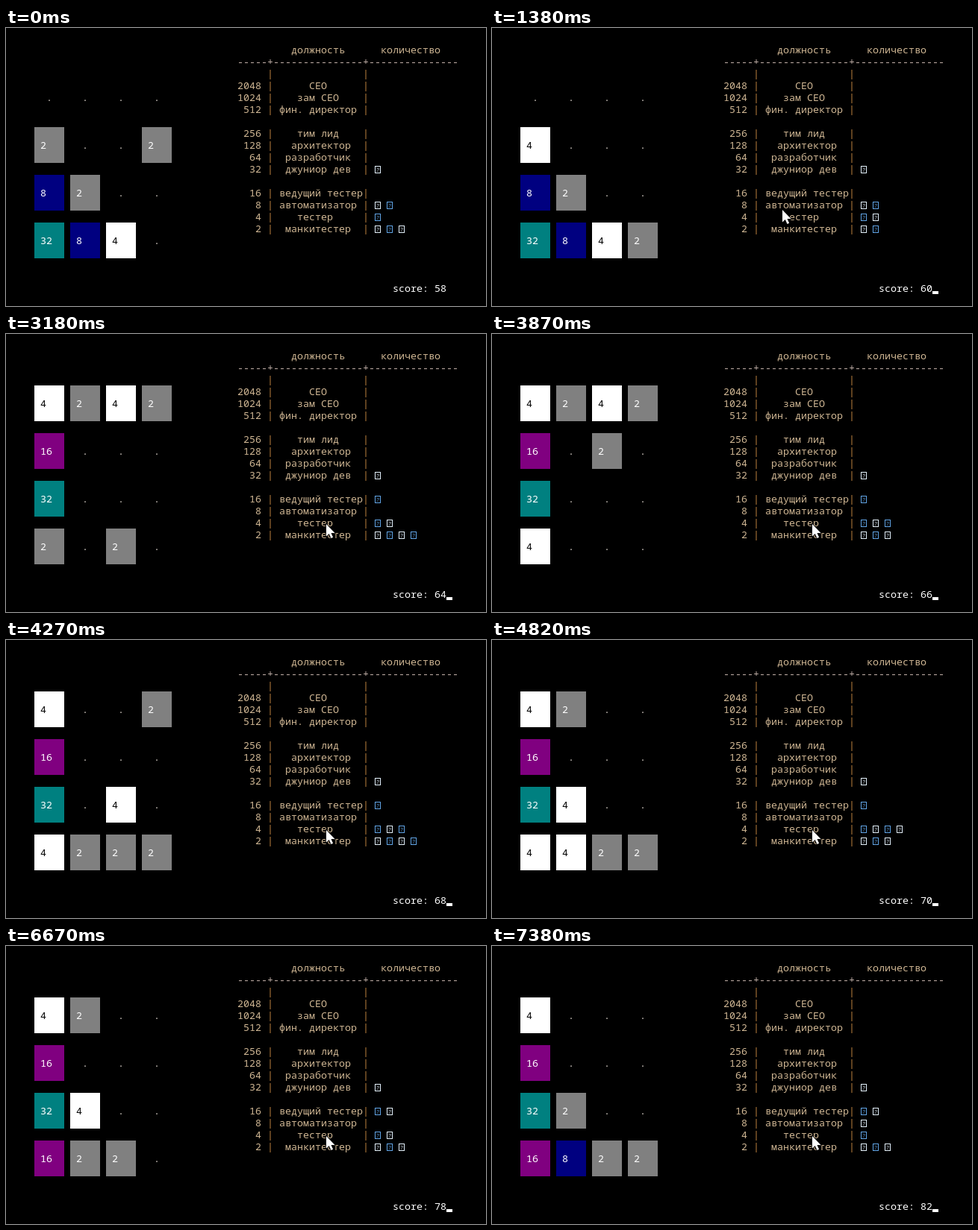
These frames come from a looping animation (643 by 373 pixels, 7990 ms). An HTML page with a canvas:

```html
<!DOCTYPE html>
<html lang="ru">
<head>
<meta charset="utf-8">
<title>2048</title>
<style>
html, body { margin: 0; width: 100%; height: 100%; overflow: hidden; background: #000; }
canvas { display: block; }
</style>
</head>
<body>
<canvas id="stage" width="643" height="373"></canvas>
<script>
const ctx = document.getElementById('stage').getContext('2d');
const LOOP = 7990, CHAR = 8, LINE = 16;
const FONT = '"Noto Sans Mono", "DejaVu Sans Mono", monospace';
const TEXT = '#d0b794', PIPE = '#c18440', RULE = '#c4b2aa';

// Console lines of the job table; null is an empty line.
const jobs = [
  [2048, '      CEO'], [1024, '    зам CEO'], [512, ' фин. директор'], null,
  [256, '    тим лид'], [128, '   архитектор'], [64, '  разработчик'], [32, '  джуниор дев'], null,
  [16, ' ведущий тестер'], [8, ' автоматизатор'], [4, '    тестер'], [2, '  манкитестер']
];

const tileColors = { 2: '#808080', 4: '#fff', 8: '#000080', 16: '#800080', 32: '#008080' };

// Start time and board, rows separated by slashes.
const boards = [
  [0,    '. . . ./2 . . 2/8 2 . ./32 8 4 .'],
  [1380, '. . . ./4 . . ./8 2 . ./32 8 4 2'],
  [2170, '4 2 4 2/8 8 . ./32 . . ./. 2 . .'],
  [3180, '4 2 4 2/16 . . ./32 . . ./2 . 2 .'],
  [3790, '4 2 4 2/16 . 2 ./32 . . ./4 . . .'],
  [4270, '4 . . 2/16 . . ./32 . 4 ./4 2 2 2'],
  [4820, '4 2 . ./16 . . ./32 4 . ./4 4 2 2'],
  [4970, '4 2 . ./16 2 . ./32 4 . ./8 4 . .'],
  [5600, '4 2 . ./16 . . ./32 4 . ./8 8 . .'],
  [6130, '4 2 . ./16 . . ./32 4 . ./16 . 2 .'],
  [6670, '4 2 . ./16 . . ./32 4 . ./16 2 2 .'],
  [7150, '4 2 . 2/16 . . ./32 4 . ./16 4 . .'],
  [7380, '4 . . ./16 . . ./32 2 . ./16 8 2 2']
].map(([time, rows]) => [time, rows.split('/').map(row => row.split(' '))]);

const pointer = [
  [990, 429, 275], [1070, 389, 244], [1450, 400, 249], [1620, 420, 253], [1690, 429, 255]
];

// Spans in which the text caret is shown.
const caret = [[1380, 2170], [2240, 3790], [3870, LOOP]];

const latest = (steps, t) => steps.filter(step => step[0] <= t).pop();

function rect(x, y, w, h, color) {
  ctx.fillStyle = color;
  ctx.fillRect(x, y, w, h);
}

function print(text, x, top, color, size = 40 / 3) {
  ctx.font = `${size}px ${FONT}`;
  ctx.fillStyle = color;
  ctx.fillText(text, x, top + 13);
}

function drawBoard(board) {
  board.forEach((row, r) => row.forEach((value, c) => {
    const x = 38 + c * 48, y = 69 + r * 64;
    if (value === '.') {
      print('.', x + 2 * CHAR, y + LINE, '#d8d0c8');
    } else {
      rect(x, y, 40, 48, tileColors[value]);
      print(value, x + CHAR, y + LINE, value === '4' ? '#000' : '#fff');
    }
  }));
}

function drawIcon(x, top, bright) {
  const color = bright ? '#e4f2ff' : '#62a6e8';
  ctx.strokeStyle = color;
  ctx.lineWidth = 1;
  ctx.strokeRect(x + 0.5, top + 4.5, 7, 9);
  print('?', x + 1.9, top - 1, color, 7);
}

function drawPipes(top) {
  print('|', 350, top, PIPE);
  print('|', 478, top, PIPE);
}

function drawTable(values) {
  print('должность', 382, 21, TEXT);
  print('количество', 502, 21, TEXT);
  const dashes = '-'.repeat(15);
  print(`-----+${dashes}+${dashes}`, 310, 37, RULE);
  drawPipes(53);
  let index = 0;
  jobs.forEach((job, line) => {
    if (!job) return;
    const [value, title] = job, top = 69 + line * LINE;
    print(String(value).padStart(4), 310, top, TEXT);
    print(title, 358, top, TEXT);
    drawPipes(top);
    const count = values.filter(v => v === value).length;
    for (let i = 0; i < count; i++) drawIcon(494 + i * 16, top, (index + i) % 2 === 0);
    index++;
  });
}

function drawPointer(x, y) {
  const arrow = new Path2D(
    `M${x} ${y}v16.5l3.8-3.5 2.7 6 2.6-1.2-2.6-5.8h5z`);
  ctx.strokeStyle = '#000';
  ctx.lineWidth = 1.5;
  ctx.stroke(arrow);
  ctx.fillStyle = '#fff';
  ctx.fill(arrow);
}

function draw(t) {
  rect(0, 0, 643, 373, '#000');
  const board = latest(boards, t)[1];
  const values = board.flat().filter(v => v !== '.').map(Number);
  drawBoard(board);
  drawTable(values);
  print(`score: ${values.reduce((a, b) => a + b)}`, 518, 341, '#fff');
  if (caret.some(([from, to]) => t >= from && t < to)) rect(590, 353, 8, 4, '#fff');
  const spot = latest(pointer, t);
  if (spot) drawPointer(spot[1], spot[2]);
}

const start = performance.now();
function tick() {
  draw((performance.now() - start) % LOOP);
  requestAnimationFrame(tick);
}
tick();
</script>
</body>
</html>
```
